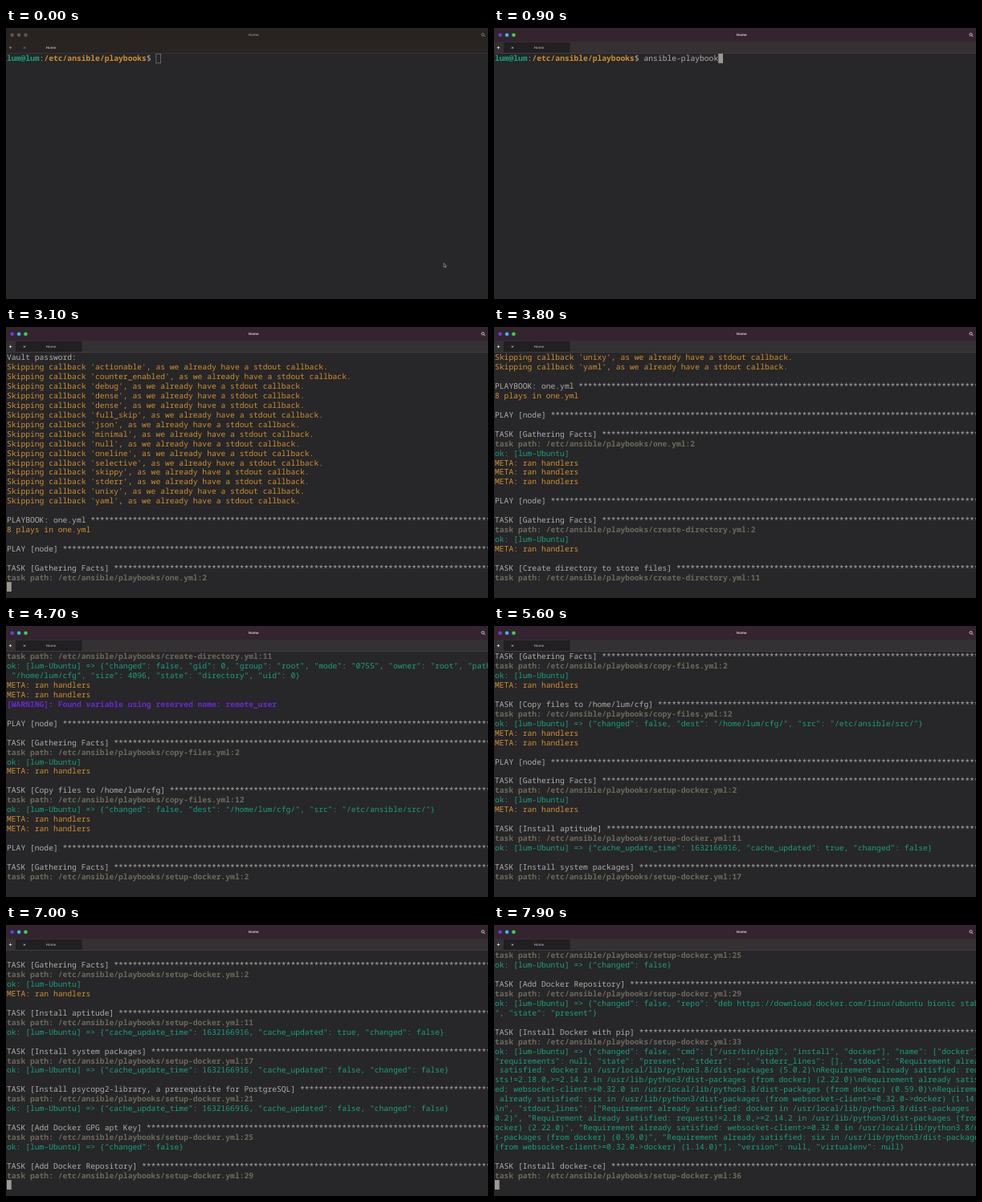
Recreate the animation shown at these times as an HTML page with a canvas. Size 600 by 338 pixels, loop 8000 ms.

```html
<!DOCTYPE html>
<html lang="en">
<head>
<meta charset="utf-8">
<title>Terminal session</title>
<style>
html, body { margin: 0; width: 100%; height: 100%; overflow: hidden; background: #272628; }
canvas { display: block; width: 600px; height: 338px; }
</style>
</head>
<body>
<canvas id="stage" width="600" height="338"></canvas>
<script>
const ctx = document.getElementById("stage").getContext("2d");
ctx.textRendering = "geometricPrecision"; // keeps fractional baselines and unhinted glyphs
const LOOP = 8000, COLS = 106, ROWS = 25;
const LEFT = 1, TOP = 32, ROW_H = 11.92, CHAR_W = 5.797;
const FONT = '9.66px "Roboto Mono", "Noto Sans Mono", monospace';
const GREY = "#b0aeab", GREEN = "#14a37d", ORANGE = "#d08f2b", DIM = "#6c6a5a", PURPLE = "#6b27d8";
const USER = "lum", HOST = USER + "-Ubuntu";
const BOOKS = "/etc/ansible/playbooks";
const COMMAND = "ansible-playbook -vv one.yml --ask-vault-pass";
const PROMPT = [[USER + "@" + USER, GREEN, true], [":", GREY], [BOOKS, ORANGE, true], ["$ ", GREY]];
const PROMPT_LEN = PROMPT.reduce((n, [text]) => n + text.length, 0);

// Builders for the log
const play = "\nPLAY [node]";
const meta = "META: ran handlers";
const task = (name, file) => `\nTASK [${name}]\ntask path: ${BOOKS}/${file}`;
const gather = file => task("Gathering Facts", file + ":2");
const ok = json => `ok: [${HOST}]` + (json ? ` => {${json}}` : "");
const cache = updated =>
  ok(`"cache_update_time": 1632166916, "cache_updated": ${updated}, "changed": false`);

const LOCAL = "/usr/local/lib/python3.8/dist-packages", SHARED = "/usr/lib/python3/dist-packages";
const requirements = [
  `docker in ${LOCAL} (5.0.2)`,
  `requests!=2.18.0,>=2.14.2 in ${SHARED} (from docker) (2.22.0)`,
  `websocket-client>=0.32.0 in ${LOCAL} (from docker) (0.59.0)`,
  `six in ${SHARED} (from websocket-client>=0.32.0->docker) (1.14.0)`
].map(text => "Requirement already satisfied: " + text);
const pipResult = ok('"changed": false, "cmd": ["/usr/bin/pip3", "install", "docker"], "name": ["docker"], ' +
  '"requirements": null, "state": "present", "stderr": "", "stderr_lines": [], ' +
  `"stdout": "${requirements.map(r => r + "\\n").join("")}", ` +
  `"stdout_lines": [${requirements.map(r => `"${r}"`).join(", ")}], "version": null, "virtualenv": null`);

const callbacks = ("actionable counter_enabled debug dense dense full_skip json minimal null " +
  "oneline selective skippy stderr unixy yaml").split(" ")
  .map(name => `Skipping callback '${name}', as we already have a stdout callback.`);

// Each step: time in ms, then the text printed at that moment
const log = [
  [2400, "ansible-playbook 2.9.6", "  config file = /etc/ansible/ansible.cfg",
    `  configured module search path = ['/home/${USER}/.ansible/plugins/modules', '/usr/share/ansible/plugins/modules']`,
    `  ansible python module location = ${SHARED}/ansible`,
    "  executable location = /usr/bin/ansible-playbook",
    "  python version = 3.8.10 (default, Jun  2 2021, 10:49:15) [GCC 9.4.0]",
    "Using /etc/ansible/ansible.cfg as config file", "Vault password: "],
  [2900, ...callbacks, "\nPLAYBOOK: one.yml", "8 plays in one.yml", play, gather("one.yml")],
  [3300, ok(), meta, meta, meta, play, gather("create-directory.yml")],
  [3700, ok(), meta, task("Create directory to store files", "create-directory.yml:11")],
  [4000, ok('"changed": false, "gid": 0, "group": "root", "mode": "0755", "owner": "root", "path": ' +
      `"/home/${USER}/cfg", "size": 4096, "state": "directory", "uid": 0`), meta, meta,
    "[WARNING]: Found variable using reserved name: remote_user", play, gather("copy-files.yml")],
  [4300, ok(), meta, task(`Copy files to /home/${USER}/cfg`, "copy-files.yml:12")],
  [4600, ok(`"changed": false, "dest": "/home/${USER}/cfg/", "src": "/etc/ansible/src/"`),
    meta, meta, play, gather("setup-docker.yml")],
  [5100, ok(), meta, task("Install aptitude", "setup-docker.yml:11")],
  [5500, cache(true), task("Install system packages", "setup-docker.yml:17")],
  [6000, cache(false),
    task("Install psycopg2-library, a prerequisite for PostgreSQL", "setup-docker.yml:21")],
  [6500, cache(false), task("Add Docker GPG apt Key", "setup-docker.yml:25")],
  [6900, ok('"changed": false'), task("Add Docker Repository", "setup-docker.yml:29")],
  [7200, ok('"changed": false, "repo": "deb https://download.docker.com/linux/ubuntu bionic stable", "state": "present"'),
    task("Install Docker with pip", "setup-docker.yml:33")],
  [7600, pipResult, task("Install docker-ce", "setup-docker.yml:36")]
];

function colorOf(line) {
  if (/^(PLAY|TASK|Vault)/.test(line)) return GREY;
  if (line.startsWith("ok:")) return GREEN;
  if (line.startsWith("task path")) return DIM;
  if (line.startsWith("[WARNING]")) return PURPLE;
  return ORANGE;
}

const lines = log.flatMap(([time, ...parts]) => parts.join("\n").split("\n").flatMap(line => {
  const color = colorOf(line), bold = color === DIM || color === PURPLE;
  const full = /^(PLAY|TASK)/.test(line) ? (line + " ").padEnd(COLS, "*") : line;
  return (full.match(new RegExp(`.{1,${COLS}}`, "g")) || [""]).map(text => ({ time, text, color, bold }));
}));

function write(text, col, row, color, bold) {
  ctx.font = (bold ? "bold " : "") + FONT;
  ctx.fillStyle = color;
  ctx.fillText(text, LEFT + col * CHAR_W, TOP + row * ROW_H + 9.4);
}

function rect(color, x, y, w, h) {
  ctx.fillStyle = color;
  ctx.fillRect(x, y, w, h);
}

function stroke(color, width, path) {
  ctx.strokeStyle = color;
  ctx.lineWidth = width;
  ctx.stroke(new Path2D(path));
}

function label(text, x, y, color, weight) {
  ctx.font = `${weight} 4.4px Inter, sans-serif`;
  ctx.textAlign = "center";
  ctx.fillStyle = color;
  ctx.fillText(text, x, y);
  ctx.textAlign = "left";
}

function drawChrome(focused) {
  const ink = focused ? "#e4e0e2" : "#8d8885";
  rect(focused ? "#34242f" : "#282321", 0, 0, 600, 17);
  rect(focused ? "#343033" : "#282423", 0, 17, 600, 14.5);
  if (focused) rect("#211f21", 12, 18, 82.5, 13);
  rect(focused ? "#484447" : "#403c3a", 0, 31, 600, 0.7);
  const dots = focused ? ["#6440e0", "#2cbfe0", "#3fd14b"] : ["#5d5653", "#5d5653", "#5d5653"];
  dots.forEach((color, i) => {
    ctx.fillStyle = color;
    ctx.beginPath();
    ctx.arc(7.7 + i * 8.4, 8.8, 2.3, 0, 7);
    ctx.fill();
  });
  label("Home", 308.3, 10.2, ink, 600);
  label("Home", 56, 26.3, focused ? "#b4b0b2" : "#d0cccb", 500);
  stroke(ink, 0.8, "M3.7 24.5h3.6M5.5 22.7v3.6M22 23.6l2 2m0-2l-2 2");
  stroke(ink, 0.8, "M595.2 8.2a1.6 1.6 0 1 0-3.2 0a1.6 1.6 0 1 0 3.2 0M594.7 9.3l1.6 1.7");
}

function drawCursor(col, row, focused) {
  const x = LEFT + col * CHAR_W, y = TOP + row * ROW_H;
  if (focused) return rect("#9a9890", x, y, CHAR_W, ROW_H);
  ctx.strokeStyle = "#777573";
  ctx.lineWidth = 0.8;
  ctx.strokeRect(x + 0.3, y + 0.3, CHAR_W, ROW_H - 0.5);
}

function draw(t) {
  const focused = t >= 100;
  const typed = COMMAND.slice(0, Math.max(0, Math.floor((t - 100) / 50)));
  const shown = lines.filter(line => line.time <= t);
  const atVault = shown.length > 0 && shown[shown.length - 1].text.startsWith("Vault");
  const cursorRow = shown.length + (shown.length && !atVault ? 1 : 0);
  const scroll = Math.max(0, cursorRow - ROWS + 1);

  rect("#272628", 0, 0, 600, 338);
  if (!scroll) {
    let col = 0;
    for (const [text, color, bold] of PROMPT) {
      write(text, col, 0, color, bold);
      col += text.length;
    }
    write(typed, col, 0, GREY);
  }
  shown.forEach(({ text, color, bold }, i) => {
    const row = i + 1 - scroll;
    if (row >= 0) write(text, 0, row, color, bold);
  });

  const blinkOn = !shown.length || (t + 65) % 220 < 110;
  const cursorCol = !shown.length ? PROMPT_LEN + typed.length : atVault ? 16 : 0;
  if (blinkOn) drawCursor(cursorCol, cursorRow - scroll, focused);
  drawChrome(focused);
  if (!focused) {
    ctx.fillStyle = "#1c1b1c";
    const arrow = "M545 293.3v5l1.1-1l.8 1.6l.8-.4l-.7-1.5h1.4z";
    ctx.fill(new Path2D(arrow));
    stroke("#b9b7b6", 0.6, arrow);
  }
}

const start = performance.now();
function tick() {
  draw((performance.now() - start) % LOOP);
  requestAnimationFrame(tick);
}
tick();
</script>
</body>
</html>
```
